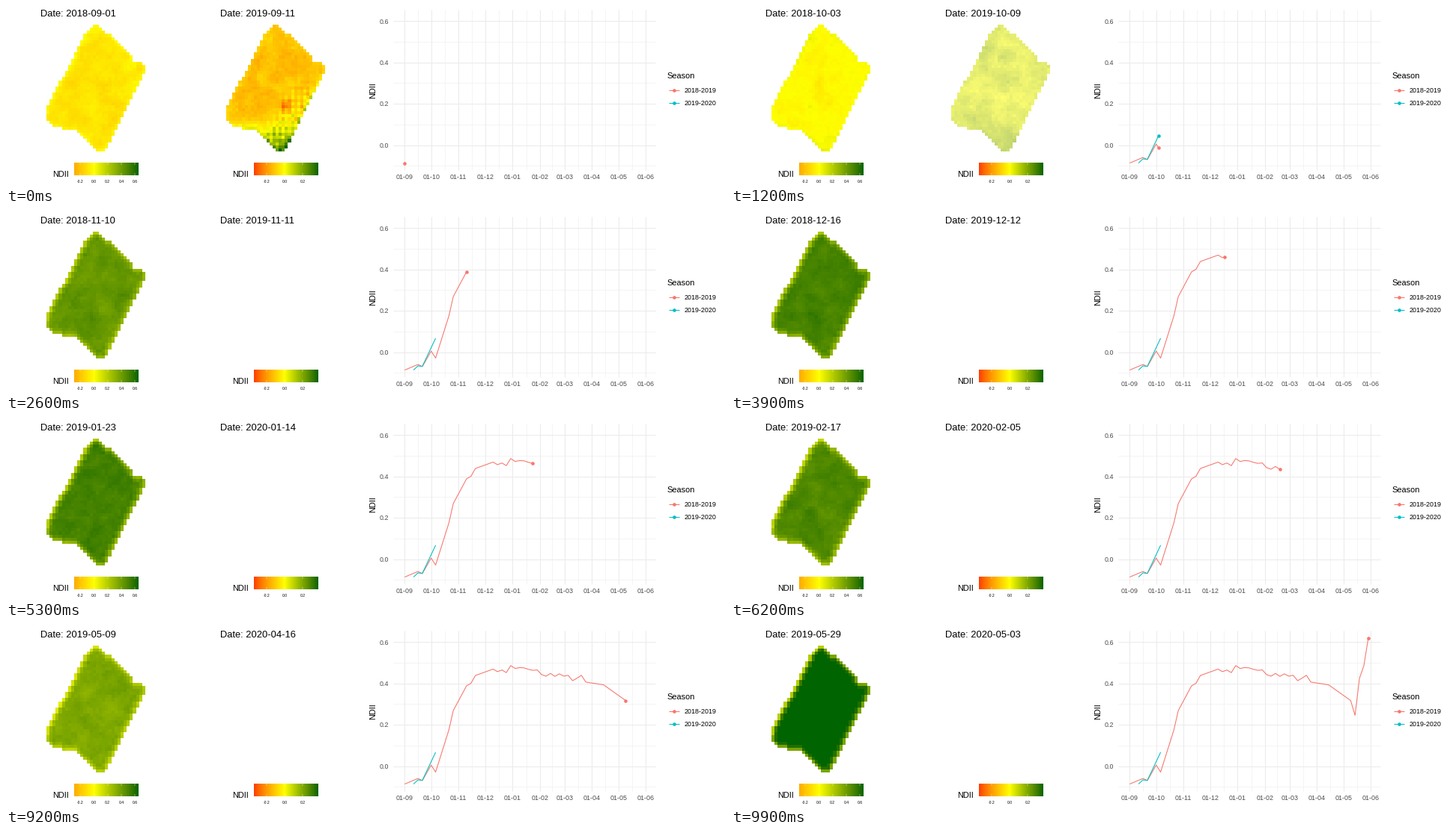
A matplotlib script that plays this animation: 960 by 240 pixels, repeating every 10 s.

```python
import numpy as np
import matplotlib.pyplot as plt
from matplotlib.animation import FuncAnimation
from matplotlib.path import Path

plt.rcParams["font.family"] = "Liberation Sans"

W, H, DPI = 960, 240, 100
FRAMES, INTERVAL = 100, 100
PX = 72 / DPI
ROWS, COLS = 41, 32
LEFT, RIGHT, TOP, BOTTOM = 54, 186, 26, 195.2
SHIFT = 240
START_A, START_B = np.datetime64("2018-09-01"), np.datetime64("2019-09-11")
SPAN_A, SPAN_B = 270, 235
LIMIT_A, LIMIT_B = .655, .375
RED, TEAL, GRID, GREY = "#F8766D", "#00BFC4", "#EBEBEB", "#4D4D4D"


# --- seasons: turning points, plus a pass every five days on the plateau ---
def season_a():
    growth = [(0, -.087), (15, -.06), (20, -.07), (30, .005), (35, -.029),
              (50, .175), (55, .269), (70, .389), (75, .401), (80, .439)]
    plateau = [(100, .47), (115, .453), (120, .487), (125, .473), (135, .476),
               (145, .464), (150, .466), (155, .443), (185, .44), (190, .414),
               (200, .44), (205, .407)]
    ripening = [(225, .394), (250, .318), (255, .246), (260, .425),
                (265, .487), (270, .62)]
    knots, levels = np.array(growth + plateau + ripening).T
    days = np.union1d(knots, np.arange(100, 206, 5))
    wiggle = .007 * np.cos(2 * np.pi * (days - 165) / 11)
    return days, np.interp(days, knots, levels) + wiggle * ~np.isin(days, knots)


DAYS_A, NDII_A = season_a()
DAYS_B, NDII_B = np.array([(10, -.087), (15, -.067), (20, -.069), (35, .067)]).T


def arrival(days, span):
    """Frame on which each acquisition is reached."""
    return np.round((FRAMES - 1) * days / span)


def sx(day):
    return 532.3 + 1.18 * np.asarray(day)


def sy(value):
    return 186.5 - 276.7 * np.asarray(value)


# --- colour scale: red - yellow - dark green, blended in Lab ---
def lab_to_rgb(lab):
    l, a, b = np.moveaxis(lab, -1, 0)
    fy = (l + 16) / 116
    f = np.stack([fy + a / 500, fy, fy - b / 200], -1)
    xyz = np.where(f > 6 / 29, f ** 3, 3 * (6 / 29) ** 2 * (f - 4 / 29))
    m = np.array([[3.2406, -1.5372, -.4986],
                  [-.9689, 1.8758, .0415],
                  [.0557, -.2040, 1.0570]])
    rgb = np.clip(xyz * [.95047, 1, 1.08883] @ m.T, 0, 1)
    return np.where(rgb <= .0031308, 12.92 * rgb, 1.055 * rgb ** (1 / 2.4) - .055)


RED_LAB, YELLOW_LAB, GREEN_LAB = (53.2, 80.1, 67.2), (97.1, -21.6, 94.5), (36.2, -43.4, 41.9)
RAMP = lab_to_rgb(np.stack([np.interp(np.linspace(-1, 1, 513), [-1, 0, 1], c)
                            for c in zip(RED_LAB, YELLOW_LAB, GREEN_LAB)], -1))


def shade(value, limit):
    t = np.clip(value / limit, -1, 1)
    return RAMP[np.round((t + 1) * 256).astype(int)]


# --- field shape ---
gx, gy = np.meshgrid(LEFT + (np.arange(COLS) + .5) * (RIGHT - LEFT) / COLS,
                     TOP + (np.arange(ROWS) + .5) * (BOTTOM - TOP) / ROWS)
row, col = np.indices((ROWS, COLS))
OUTLINE = Path([(118, 25), (142, 43), (158, 58), (172, 74), (187, 80), (185, 91),
                (131, 196), (123, 196), (96, 168), (66, 163), (54, 151),
                (54, 138), (106, 38)])
MASK = OUTLINE.contains_points(np.c_[gx.ravel(), gy.ravel()]).reshape(ROWS, COLS)


def erode(m):
    p = np.pad(m, 1)
    return m & p[:-2, 1:-1] & p[2:, 1:-1] & p[1:-1, :-2] & p[1:-1, 2:]


inner = erode(MASK)
RIM = MASK & ~inner
EDGE = (RIM + .3 * (inner & ~erode(inner))) * np.where(gx + .57 * gy < 140, 1.2, .8)
EDGE -= EDGE[MASK].mean()


def noise(seed, rounds=2):
    rng = np.random.default_rng(seed)
    a = rng.normal(size=(ROWS, COLS))
    for _ in range(rounds):
        for axis in (0, 1):
            a = (np.roll(a, 1, axis) + 2 * a + np.roll(a, -1, axis)) / 4
    a += .12 * rng.normal(size=a.shape)
    a -= a[MASK].mean()
    return a / a[MASK].std()


def bump(d, width):
    return np.exp(-(d / width) ** 2)


def sigmoid(x):
    return 1 / (1 + np.exp(-x))


BAND = bump(gy - 100 - .45 * (gx - 80), 7) - .2
STREAK = bump(gx - 118, 6) * bump(gy - 112, 34)


def dry_map():
    """Opening state of the second season, with wet and dry patches."""
    side = (186 - gx) - (gy - 86) * .51
    zone = sigmoid((gy - 112) / 8) * sigmoid((34 - side) / 5)
    v = -.135 + .014 * noise(71) + .012 * noise(72, 5) + .03 * RIM - .025 * BAND
    v += zone * (.02 + .07 * (col % 2) + .06 * (row % 2) + .025 * noise(73, 0))
    v += .15 * sigmoid((gy - 160) / 4)
    v += .20 * sigmoid((gy - 184) / 3) * sigmoid((gx - 118) / 3)
    v += .13 * RIM * zone * (noise(75, 0) > .2)
    return v - .2 * bump(gx - 134, 7) * bump(gy - 135, 7)


def wet_map(mean, seed):
    v = mean + .016 * noise(seed) + .016 * noise(90, 5)
    return v + .08 * sigmoid((gy - 172) / 7) - .025 * bump(gy - 115 - .3 * (gx - 100), 12)


def map_a_at(day, mean, grain):
    edge = (.45 + .001 * day) * mean - .02
    amp = .017 * np.clip((272 - day) / 12, .2, 1)
    v = 1.05 * mean + amp * (grain + .6 * noise(500, 5)) - edge * EDGE
    v -= .03 * BAND * np.clip(1 - day / 30, 0, 1)
    early = bump(day - 32, 12)
    return v + early * (.05 * sigmoid((gy - 172) / 6) - .06 * STREAK)


MAPS_A = [map_a_at(d, m, noise(k)) for k, (d, m) in enumerate(zip(DAYS_A, NDII_A))]
MAPS_B = [dry_map(), .6 * dry_map() + .4 * wet_map(-.06, 81),
          wet_map(-.065, 82), wet_map(.07, 83)]
FRAMES_A = arrival(DAYS_A, SPAN_A)
FRAMES_B = arrival(DAYS_B - DAYS_B[0], SPAN_B)
CLOUDED = arrival(35, SPAN_B)


def blend(i, frames, maps):
    k = np.clip(np.searchsorted(frames, i, "right") - 1, 0, len(maps) - 2)
    t = min((i - frames[k]) / (frames[k + 1] - frames[k]), 1)
    return (1 - t) * maps[k] + t * maps[k + 1]


# --- stage ---
fig = plt.figure(figsize=(W / DPI, H / DPI), dpi=DPI, facecolor="white")
ax = fig.add_axes([0, 0, 1, 1])
ax.axis("off")


def label(x, y, s, size, color="black", **kw):
    return ax.text(x, y, s, fontsize=size * PX, color=color, va="baseline", **kw)


def line(xs, ys, color, width, z=2):
    return ax.plot(xs, ys, color=color, lw=width * PX, zorder=z,
                   solid_capstyle="butt")[0]


def dot(x, y, color):
    return ax.plot(x, y, "o", color=color, ms=4.6 * PX, mew=0, zorder=5)[0]


def picture(data, extent):
    return ax.imshow(data, extent=extent, aspect="auto", interpolation="nearest")


def colorbar(x, low, high, limit, ticks):
    label(x - 28.5, 229, "NDII", 11)
    picture(shade(np.linspace(low, high, 86), limit)[None], (x, x + 86, 227, 210))
    for v in ticks:
        tx = x + 86 * (v - low) / (high - low)
        for y in (210, 223.6):
            line([tx, tx], [y, y + 3.4], "white", .4)
        label(tx, 237, f"{v:.1f}", 5, ha="center")


def draw_axes():
    x0, x1, y0, y1 = 516.5, 867, 5.4, 220.2
    months = np.arange("2018-09", "2019-07", dtype="datetime64[M]")
    days = (months.astype("datetime64[D]") - START_A).astype(int)
    for d in (days[1:] + days[:-1]) / 2:
        line([sx(d)] * 2, [y0, y1], GRID, .53, 1)
    for d, month in zip(days, months):
        line([sx(d)] * 2, [y0, y1], GRID, 1.07, 1)
        label(sx(d), 232, f"01-{str(month)[-2:]}", 8.9, GREY, ha="center")
    for k in range(-1, 7):
        major = k % 2 == 0
        line([x0, x1], [sy(k / 10)] * 2, GRID, 1.07 if major else .53, 1)
        if major:
            label(511, sy(k / 10) + 3.2, f"{k / 10:.1f}", 8.9, GREY, ha="right")
    label(493, 113, "NDII", 11, rotation=90, ha="center", rotation_mode="anchor")


def draw_legend():
    label(882.5, 97, "Season", 11)
    for y, color, name in ((112.7, RED, "2018-2019"), (129.9, TEAL, "2019-2020")):
        line([885, 899], [y, y], color, 1.07)
        dot([892], [y], color)
        label(905.7, y + 3.2, name, 8.9)


colorbar(91, -.293, LIMIT_A, LIMIT_A, np.linspace(-.2, .6, 5))
colorbar(331, -.342, LIMIT_B, LIMIT_B, np.linspace(-.2, .2, 3))
draw_axes()
draw_legend()

title_a, title_b = (label(x, 14, "", 12.9) for x in (46.5, 286.5))
blank = np.zeros((ROWS, COLS, 4))
map_a, map_b = (picture(blank, (LEFT + s, RIGHT + s, BOTTOM, TOP)) for s in (0, SHIFT))
SEASONS = [(days, values, arrival(days, SPAN_A),
            line([], [], color, 1.07, 3), dot([], [], color))
           for days, values, color in ((DAYS_A, NDII_A, RED), (DAYS_B, NDII_B, TEAL))]

ax.set_xlim(0, W)
ax.set_ylim(H, 0)


def reveal(i, days, values, frames, trace, head):
    past = frames <= i
    tip = np.interp(i, frames, days)
    x = sx(np.append(days[past], tip))
    y = sy(np.append(values[past], np.interp(tip, days, values)))
    trace.set_data(x, y)
    trace.set_visible(past.any())
    head.set_data(x[-1:], y[-1:])
    head.set_visible(frames[0] <= i <= frames[-1])


def draw(i):
    p = i / (FRAMES - 1)
    title_a.set_text(f"Date: {START_A + int(SPAN_A * p)}")
    title_b.set_text(f"Date: {START_B + int(SPAN_B * p)}")
    map_a.set_data(np.dstack([shade(blend(i, FRAMES_A, MAPS_A), LIMIT_A), MASK * 1.0]))
    # clouds hide the second season after its last clear image
    clear = np.clip((CLOUDED - i) / (CLOUDED - FRAMES_B[-1]), 0, 1) ** 2
    map_b.set_data(np.dstack([shade(blend(i, FRAMES_B, MAPS_B), LIMIT_B), MASK * clear]))
    for season in SEASONS:
        reveal(i, *season)
    return []


anim = FuncAnimation(fig, draw, frames=FRAMES, interval=INTERVAL,
                     repeat=True, repeat_delay=0, blit=False)
plt.show()
```
